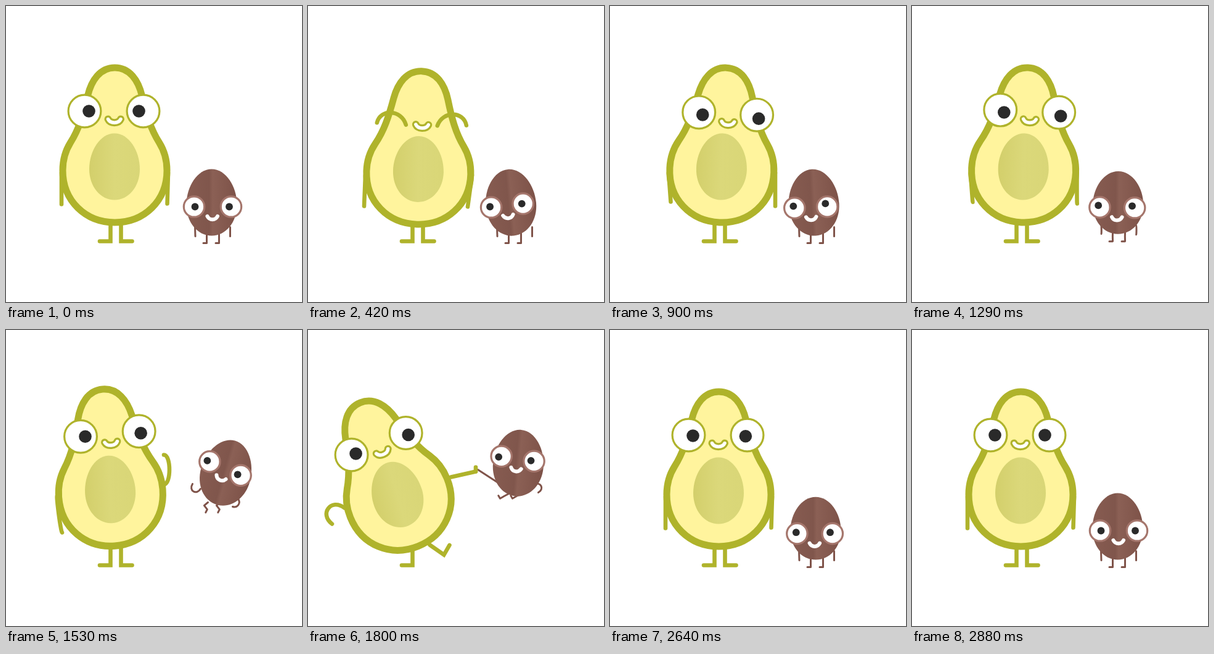
An HTML page for the animation above (3150 ms loop, 480 px wide and 480 px high).

```html
<!DOCTYPE html>
<html lang="en">
<head>
<meta charset="utf-8">
<title>Avocado and seed</title>
<style>
  html, body { margin: 0; width: 100%; height: 100%; overflow: hidden; background: #fff; }
  svg { display: block; width: 100vw; height: 100vh; }
  .line { fill: none; stroke-linecap: round; }
  .green { stroke: #afb32b; stroke-width: 6.6; }
  .brown { stroke: #7f5349; stroke-width: 3; stroke-linejoin: round; }
</style>
</head>
<body>
<svg id="stage" viewBox="-.5 -.5 480 480">
  <defs>
    <linearGradient id="pit">
      <stop stop-color="#d3cf6b"/><stop offset=".5" stop-color="#dbd87a"/><stop offset="1" stop-color="#d9d677"/>
    </linearGradient>
    <linearGradient id="bark">
      <stop stop-color="#875c51"/><stop offset=".45" stop-color="#80564c"/>
      <stop offset=".52" stop-color="#8b6055"/><stop offset="1" stop-color="#7d5248"/>
    </linearGradient>
  </defs>
</svg>
<script>
const LOOP = 3150, STEP = 30;
const EGG = 'M0-108C23-108 41-80 41-50C41-22 23 0 0 0S-41-22-41-50C-41-80-23-108 0-108Z';
const PEAR = 'M0-162.5C-24-162.5-38-142-44-117C-51-87-58-63-72-41C-82-25-84.5-10-84.5 4' +
  'C-84.5 54-47 88.5 0 88.5S84.5 54 84.5 4C84.5-10 82-25 72-41C58-63 51-87 44-117C38-142 24-162.5 0-162.5Z';

// body: dx, dy, tilt, height | face: dx, dy, extra tilt, eye gap | gaze: left x, y, right x, y
// arms: shoulder lift, hand dx, dy, bow
function avocadoPoses() {
  const rest = {
    body: [0, 0, 0, 1], face: [0, 0, 0, 95], gaze: [7, 0, -7, 0],
    left: [0, 0, 51, 0], right: [0, -1.5, 50, 0], kick: [0], grip: [0]
  };
  const lean = { ...rest, body: [-3, -5, -1.5, 1], left: [0, -11, 52, 0] };
  const laugh = { ...rest, body: [3, 4, 1.7, .99], face: [4, 4, 0, 95], left: [0, -2, 50, 0], right: [0, -7, 51, 0] };
  const glance = {
    ...rest, body: [5, 0, 2.6, 1], face: [7, 4, 0, 94], gaze: [6, 4, 3, 6],
    left: [0, 3.5, 47, 0], right: [0, 0, 54, 0]
  };
  const peek = { ...glance, face: [7, -12, 0, 95], gaze: [7, -2, 3, -1] };
  const crouch = { ...glance, face: [7, 0, 0, 95] };
  const land = { ...rest, gaze: [7, 1, -2, 2] };
  const leap = {
    ...rest, body: [-7, -2, -4.4, 1.015], face: [7.5, 1, -.7, 95], gaze: [7.5, 0, 3, 3],
    left: [0, 8, 60, 2], right: [-18, 0, -48, 12]
  };
  const pull = {
    body: [-31, 6, -22, 1], face: [5, 1, 0, 95], gaze: [7, -2, 4, 3],
    left: [12, -20, 26, 27], right: [-38, 40, -9, 0], kick: [1], grip: [1]
  };
  const swing = {
    ...pull, body: [-24, 3, -16.5, 1], face: [9, 2, 0, 95], gaze: [7.5, -.5, 3.5, 3],
    left: [9, -14, 28, 24], right: [-33, 36.5, -14, 0]
  };
  return { rest, lean, laugh, glance, peek, crouch, land, leap, pull, swing };
}

// legs: hip shift, thigh, shin and foot angle
function seedPoses() {
  const rest = {
    body: [0, 0, 0, 1], face: [0, 0, 0, 60], gaze: [1.5, 0, -3, 0],
    left: [0, .5, 15, 0], right: [0, 0, 15, 0], legs: [0, 90, 90, 180]
  };
  const lean = { ...rest, body: [0, 0, 2, 1] };
  const laugh = { ...rest, body: [0, 0, -5, 1], face: [-8, -2, -1.5, 52], gaze: [-2, -1, -2, 0] };
  const glance = { ...rest, body: [0, 0, -3.3, 1], face: [-6.5, 1, 1, 53], gaze: [-2, -3, -3, -5] };
  const peek = { ...rest, gaze: [0, -2, -3, -2] };
  const crouch = { ...rest, body: [0, 0, 0, .94], face: [-3, 2, 0, 57], gaze: [-2, -3, -4, -3] };
  const land = { ...crouch, gaze: [-2, -2, -4, -2] };
  const leap = {
    body: [9, -89, 15.5, 1], face: [-1, -14, 8.5, 55], gaze: [-4, -1.5, -5, -1.5],
    left: [-12, -13, -8, -13], right: [2, -5, 15, -11], legs: [-7, 140, 52, 117]
  };
  const pull = {
    body: [3, -103, 5, 1], face: [-2, -14, 3.6, 53.5], gaze: [-4.5, 1, -5, -1],
    left: [-7, -34, -22, 0], right: [-5, 7, 13, -12], legs: [-3, 152, 150, 240]
  };
  const swing = {
    ...pull, body: [6, -105, 7, 1], face: [-2, -13, 6, 53.5], gaze: [-4.5, -2, -5.5, -2],
    left: [-9, -33, -23, 0], right: [0, 2, 12, -12]
  };
  return { rest, lean, laugh, glance, peek, crouch, land, leap, pull, swing };
}

function blend(a, b, u) {
  const out = {};
  for (const key in a) out[key] = a[key].map((v, i) => v + (b[key][i] - v) * u);
  return out;
}

// One schedule drives both characters; the grab snaps shut within a single step.
const schedule = p => [
  [150, p.rest], [270, p.lean], [420, p.laugh], [690, p.glance], [900, p.glance], [1050, p.peek],
  [1260, p.crouch], [1530, p.leap], [1770, blend(p.leap, p.pull, .6)], [1800, p.pull],
  [2250, p.swing], [2370, p.swing], [2610, p.land], [2880, p.rest]
];

// Smooth motion through the key poses, without overshoot.
function poseAt(keys, t) {
  const last = keys.length - 1;
  if (t <= keys[0][0]) return keys[0][1];
  if (t >= keys[last][0]) return keys[last][1];
  const i = keys.findIndex(k => k[0] > t) - 1;
  const span = keys[i + 1][0] - keys[i][0], u = (t - keys[i][0]) / span;
  const out = {};
  for (const part in keys[i][1]) {
    out[part] = keys[i][1][part].map((from, n) => {
      const value = j => keys[j][1][part][n];
      const rate = j => (value(j + 1) - value(j)) / (keys[j + 1][0] - keys[j][0]);
      const slope = j => {
        if (j === 0 || j === last) return 0;
        const a = rate(j - 1), b = rate(j);
        return a * b > 0 ? 2 * a * b / (a + b) : 0;
      };
      return from + (value(i + 1) - from) * u * u * (3 - 2 * u) +
        span * u * (1 - u) * (slope(i) * (1 - u) - slope(i + 1) * u);
    });
  }
  return out;
}

function polar(x, y, degrees, length) {
  const a = degrees * Math.PI / 180;
  return [x + length * Math.cos(a), y + length * Math.sin(a)];
}

function turn(x, y, degrees) {
  return polar(0, 0, degrees + Math.atan2(y, x) * 180 / Math.PI, Math.hypot(x, y));
}

// A curve from shoulder to hand, bowed sideways.
function arm(x, y, [lift, dx, dy, bow]) {
  const k = bow / Math.hypot(dx, dy), bx = -dy * k, by = dx * k;
  return `M${x} ${y + lift}c${bx} ${by} ${dx + bx} ${dy + by} ${dx} ${dy}`;
}

function leg(x, y, ...joints) {
  let d = `M${x} ${y}`;
  for (const [angle, length] of joints) {
    [x, y] = polar(x, y, angle, length);
    d += `L${x} ${y}`;
  }
  return d;
}

const stage = document.getElementById('stage');

function add(parent, tag, attrs = {}) {
  const node = document.createElementNS('http://www.w3.org/2000/svg', tag);
  set(node, attrs);
  return parent.appendChild(node);
}

function set(node, attrs) {
  for (const key in attrs) node.setAttribute(key, attrs[key]);
}

function build({ poses, pivot, face, limb, rim, eye, pupil }) {
  const who = { pivot, face, keys: schedule(poses) };
  who.limbs = Array.from({ length: 4 }, () => add(stage, 'path', { class: 'line ' + limb }));
  who.shape = add(stage, 'g');
  who.head = add(stage, 'g');
  who.eyes = [-1, 1].map(() => {
    const ball = add(who.head, 'g');
    add(ball, 'circle', { r: eye, fill: '#fff', stroke: rim, 'stroke-width': 3.2 });
    return { ball, pupil: add(ball, 'circle', { r: pupil, fill: '#2a2a2a' }) };
  });
  return who;
}

const avocado = build({
  poses: avocadoPoses(), pivot: [176, 262], face: [174.5, 170],
  limb: 'green', rim: '#afb32b', eye: 26.4, pupil: 10.3
});
const seed = build({
  poses: seedPoses(), pivot: [333, 372], face: [334.5, 325],
  limb: 'brown', rim: '#a5766c', eye: 16.7, pupil: 5.9
});

add(avocado.shape, 'path', { d: PEAR, fill: '#fff49d', stroke: '#afb32b', 'stroke-width': 11 });
const hollow = add(avocado.shape, 'path', { d: EGG, fill: 'url(#pit)' });
add(seed.shape, 'path', { d: EGG, fill: 'url(#bark)' });

const smile = (who, d, stroke, width) =>
  add(who.head, 'path', { class: 'line', d, stroke, 'stroke-width': width });
const GRIN = 'M-9.5 13C-6 20.5 7.5 20.5 11 13';
smile(avocado, GRIN, '#afb32b', 12);
smile(avocado, GRIN, '#fff', 5.5);
smile(seed, 'M-8.5 15.5C-5 22.5 4.5 22.5 8 15.5', '#fff', 6);

const lids = [1, -1].map(side => ({
  side,
  node: add(avocado.head, 'path', { class: 'line green', d: 'M-25 12C-20-11 14-11 22 14' })
}));
const thumb = add(stage, 'path', { class: 'line green' });

function pose(who, t) {
  const now = poseAt(who.keys, t);
  const [dx, dy, tilt, height] = now.body, [fx, fy, nod, gap] = now.face;
  const x = who.pivot[0] + dx, y = who.pivot[1] + dy, angle = tilt + nod;
  const [ax, ay] = turn(who.face[0] - who.pivot[0], (who.face[1] - who.pivot[1]) * height, tilt);
  set(who.shape, { transform: `translate(${x} ${y}) rotate(${tilt}) scale(1 ${height})` });
  set(who.head, { transform: `translate(${x + ax + fx} ${y + ay + fy}) rotate(${angle})` });
  who.eyes.forEach(({ ball, pupil }, i) => {
    set(ball, { transform: `translate(${(i - .5) * gap} 0) rotate(${-angle})` });
    set(pupil, { cx: now.gaze[2 * i], cy: now.gaze[2 * i + 1] });
  });
  return { ...now, x, y, tilt, gap };
}

const drawLimbs = (who, ...paths) => paths.forEach((d, i) => set(who.limbs[i], { d }));
const show = (node, visible) => set(node, { display: visible ? 'inline' : 'none' });

function renderAvocado(t) {
  const { x, y, tilt, gap, left, right, kick: [k], grip: [grip] } = pose(avocado, t);
  drawLimbs(avocado,
    arm(x - 86.5, y + 8, left),
    arm(x + 86.5, y + 8, right),
    leg(169, 345, [90, 36], [180, 17.5]),
    leg(186 + 11 * k, 345 + 3 * k, [90 - 55 * k, 36 - 8 * k], [-60 * k, 18]));
  set(hollow, { transform: `rotate(${-.28 * tilt}) translate(-.5 52)` });

  set(thumb, { d: `M${x + 86.5 + right[1]} ${y + 8 + right[0] + right[2]}v${-7 * grip}` });
  show(thumb, grip > 0);

  const laughing = t >= 270 && t < 600;
  avocado.eyes.forEach(({ ball }) => show(ball, !laughing));
  lids.forEach(({ side, node }) => {
    show(node, laughing);
    set(node, { transform: `translate(${-side * gap / 2} 0) scale(${side} 1)` });
  });
}

function renderSeed(t) {
  const { x, y, left, right, legs: [shift, thigh, shin, foot] } = pose(seed, t);
  const joints = [[thigh, 8], [shin, 8], [foot, 5.5]];
  drawLimbs(seed,
    arm(x - 27, y - 14, left),
    arm(x + 30, y - 14, right),
    leg(x - 8 + shift, y - 4, ...joints),
    leg(x + 12 + shift, y - 4, ...joints));
}

const start = performance.now();
function tick() {
  const elapsed = (performance.now() - start) % LOOP;
  const t = Math.floor(elapsed / STEP) * STEP;
  renderAvocado(t);
  renderSeed(t);
  requestAnimationFrame(tick);
}
tick();
</script>
</body>
</html>
```
